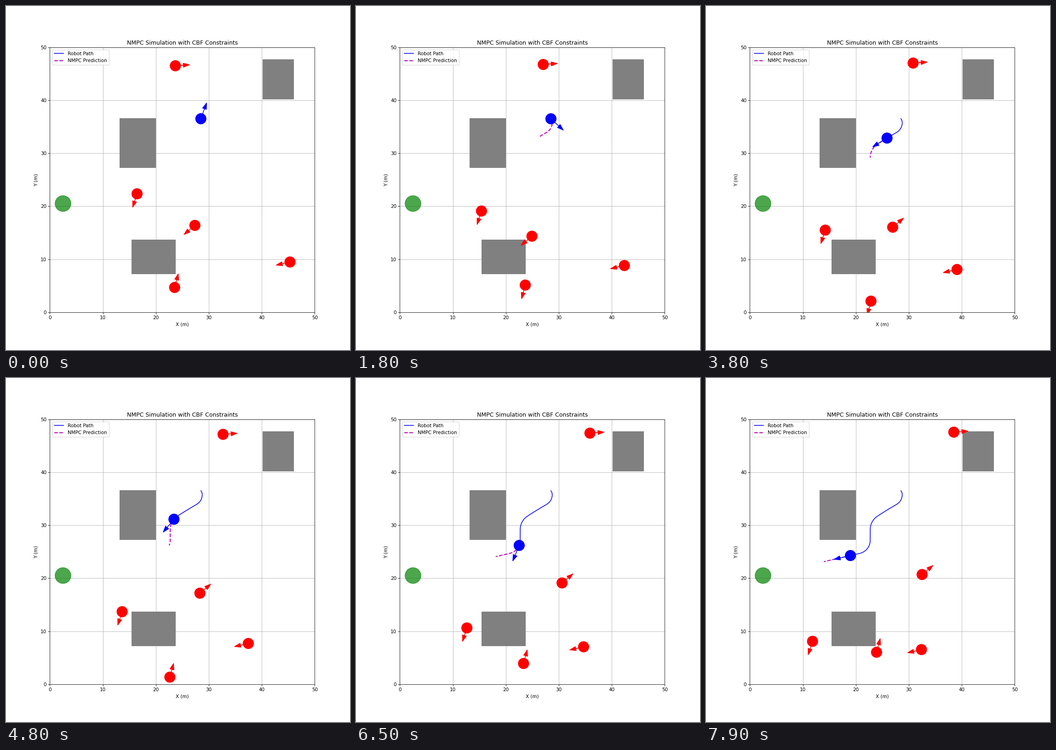
A matplotlib script for the animation above (8000 ms loop, 748 px wide and 748 px high).

```python
import numpy as np
import matplotlib.pyplot as plt
from matplotlib.animation import FuncAnimation
from matplotlib.patches import Circle, FancyArrow, Rectangle

FRAMES, INTERVAL = 80, 100
SIZE, RADIUS = 50, 1.0
HORIZON = 17                 # prediction length in frames
SPEED = 0.302                # robot cruising speed per frame
SET_OFF, CRUISE = 17, 25     # robot speeds up between these frames
SUB = 20                     # integration steps per frame

# left, bottom, right, top
BLOCKS = [
    (13.13, 27.28, 19.92, 36.64),
    (40.12, 40.26, 45.96, 47.75),
    (15.38, 7.25, 23.66, 13.72),
]

# x, y, speed per frame, direction in degrees
MOVERS = [
    (23.69, 46.51, 0.188, 4.1),
    (23.55, 4.66, 0.157, 75),
    (45.33, 9.47, 0.168, 192.8),
    (16.46, 22.34, 0.1897, 252),
    (27.37, 16.38, 0.1767, 220),
]

# robot heading in degrees, turned evenly between these frames
TURNS = {0: 70, 4: 63, 9: 33, 25: -101, 31: -150, 45: -147,
         55: -90, 61.7: -90, 73: -167}


def unit(deg):
    a = np.radians(deg)
    return np.array([np.cos(a), np.sin(a)])


def heading(t):
    return np.interp(t, list(TURNS), list(TURNS.values()))


def drive(start, frames):
    """Integrate speed and heading into a path of shape (2, n)."""
    t = (np.arange(frames * SUB) + 0.5) / SUB
    v = SPEED * np.clip((t - SET_OFF) / (CRUISE - SET_OFF), 0, 1)
    steps = np.cumsum(v * unit(heading(t)), axis=1) / SUB
    return np.array(start)[:, None] + np.hstack([np.zeros((2, 1)), steps])


def blocked(pos):
    if pos.min() < RADIUS or pos.max() > SIZE - RADIUS:
        return True
    return any(np.hypot(*(pos - np.clip(pos, b[:2], b[2:]))) < RADIUS
               for b in BLOCKS)


def bounce(x, y, speed, deg):
    """Position and direction per frame; a blocked mover waits and turns back."""
    pos, way = np.array([x, y]), unit(deg)
    track = [(pos, way)]
    for _ in range(FRAMES - 1):
        ahead = pos + speed * way
        if blocked(ahead):
            way = -way
        else:
            pos = ahead
        track.append((pos, way))
    return track


class Agent:
    """Disc with a direction arrow."""

    def __init__(self, ax, color, length):
        self.length = length
        self.disc = ax.add_patch(Circle((0, 0), RADIUS, color=color, zorder=3))
        self.arrow = ax.add_patch(FancyArrow(
            0, 0, length, 0, width=0.001, head_width=0.8, head_length=1.2,
            fc=color, ec=color, zorder=3))

    def place(self, pos, way):
        dx, dy = self.length * way
        self.disc.center = tuple(pos)
        self.arrow.set_data(x=pos[0], y=pos[1], dx=dx, dy=dy)


fig, ax = plt.subplots(figsize=(10, 10), dpi=74.8)
ax.set_xlim(0, SIZE)
ax.set_ylim(0, SIZE)
ax.set_aspect("equal")
ax.set_axisbelow(True)
ax.grid(True)
ax.set_title("NMPC Simulation with CBF Constraints")
ax.set_xlabel("X (m)")
ax.set_ylabel("Y (m)")

for x0, y0, x1, y1 in BLOCKS:
    ax.add_patch(Rectangle((x0, y0), x1 - x0, y1 - y0, color="gray"))
ax.add_patch(Circle((2.48, 20.5), 1.5, color="green", alpha=0.7))

path, = ax.plot([], [], "b-", label="Robot Path")
forecast, = ax.plot([], [], "m--", lw=2, label="NMPC Prediction")
ax.legend(loc="upper left")

movers = [Agent(ax, "red", 1.5) for _ in MOVERS]
tracks = [bounce(*m) for m in MOVERS]
robot = Agent(ax, "blue", 2.0)
route = drive((28.50, 36.51), FRAMES + HORIZON)


def update(k):
    for agent, track in zip(movers, tracks):
        agent.place(*track[k])
    now = k * SUB
    robot.place(route[:, now], unit(heading(k)))
    path.set_data(*route[:, :now + 1])

    # before cruising, the prediction reaches a little further
    reach = HORIZON + 2 * np.clip((CRUISE - k) / 15, 0, 1)
    end = now + int(reach * SUB) if k else 0
    forecast.set_data(*route[:, now:end + 1])
    return [path, forecast]


anim = FuncAnimation(fig, update, frames=FRAMES, interval=INTERVAL,
                     init_func=lambda: update(0), repeat=True, repeat_delay=0)
plt.show()
```
